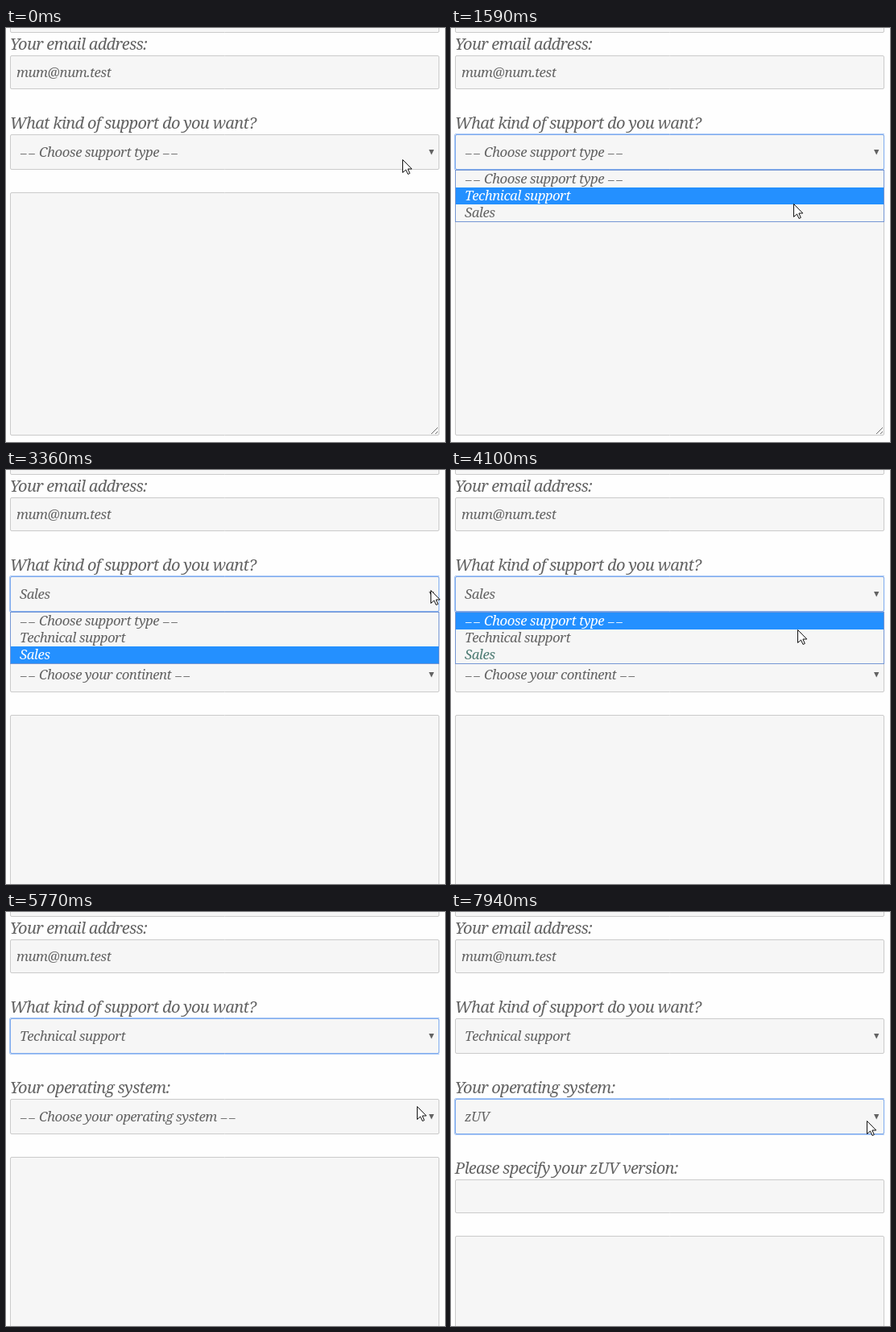
An HTML page with a canvas that plays this animation: 545 by 514 pixels, repeating every 7.99 s.

```html
<!DOCTYPE html>
<html lang="en">
<head>
<meta charset="utf-8">
<title>Conditional form</title>
<style>
html, body { margin: 0; width: 100%; height: 100%; overflow: hidden; background: #fefefe; }
canvas { display: block; }
</style>
</head>
<body>
<canvas id="stage" width="545" height="514"></canvas>
<script>
const ctx = document.getElementById('stage').getContext('2d');
const LOOP = 7990;
const W = 545, H = 514, LEFT = 5, WIDTH = 533;
const INK = '#636363', FILL = '#f6f6f6', BORDER = '#cbcbcb', PICK = '#2490ff';
const RING = '#7fabee', GLOW = '#a9c8f6';

const SUPPORT = ['-- Choose support type --', 'Technical support', 'Sales'];
const SYSTEMS = ['-- Choose your operating system --', 'Android', 'zUV', 'Linux', 'Pebbles', 'Other'];
const CONTINENT = '-- Choose your continent --';

// Pointer path: time, x, y
const PATH = [
  [0, 492, 163], [50, 492, 163], [240, 533, 139], [460, 528, 154],
  [1210, 528, 154], [1640, 417, 223], [2570, 417, 223], [2880, 525, 149],
  [3000, 525, 149], [3030, 527, 149], [3850, 527, 149], [4100, 430, 198],
  [4280, 426, 199], [5260, 426, 199], [5900, 525, 249], [6460, 525, 249],
  [6690, 452, 293], [6970, 440, 328], [7540, 440, 328], [7940, 516, 259], [LOOP, 516, 259]
];

// Open lists: time span, top edge, options, row lit before the pointer enters
const MENUS = [
  { from: 800, to: 2010, y: 176, items: SUPPORT, start: 0 },
  { from: 3360, to: 4610, y: 176, items: SUPPORT, start: 2 },
  { from: 6100, to: 7250, y: 276, items: SYSTEMS, start: 0 }
];

const clamp = v => Math.max(0, Math.min(1, v));
const swing = v => 0.5 - Math.cos(Math.PI * clamp(v)) / 2;
const slide = (t, start, size) => Math.floor(size * swing((t - start) / 215));

function pointer(t) {
  let i = 1;
  while (i < PATH.length - 1 && t > PATH[i][0]) i++;
  const [t0, x0, y0] = PATH[i - 1], [t1, x1, y1] = PATH[i];
  const p = clamp((t - t0) / (t1 - t0));
  const e = (p + p * p * (3 - 2 * p)) / 2;
  return { x: Math.round(x0 + (x1 - x0) * e), y: Math.round(y0 + (y1 - y0) * e) };
}

function write(str, x, y, size, spacing, color) {
  ctx.font = `italic 400 ${size}px "Noto Serif", serif`;
  ctx.letterSpacing = spacing + 'px';
  ctx.fillStyle = color;
  ctx.fillText(str, x, y);
  return ctx.measureText(str).width;
}

const label = (str, y) => write(str, 4.7, y, 20, -0.7, INK);

function value(str, x, y, color = INK) {
  if (!str.startsWith('-- ')) return write(str, x, y, 16.8, -0.5, color);
  const dash = dx => write('\u2013\u2013', dx, y, 15, 2.8, color);
  dash(x + 1);
  const w = write(str.slice(3, -3), x + 24, y, 16.8, -0.5, color);
  dash(x + 29 + w);
}

function box(y, h) {
  ctx.beginPath();
  ctx.roundRect(LEFT + 0.5, y + 0.5, WIDTH - 1, h - 1, 1.5);
  ctx.fillStyle = FILL;
  ctx.fill();
  ctx.lineWidth = 1;
  ctx.strokeStyle = BORDER;
  ctx.stroke();
}

function outline(y, h, grow, color) {
  ctx.beginPath();
  ctx.roundRect(LEFT + 0.5 - grow, y + 0.5 - grow, WIDTH - 1 + 2 * grow, h - 1 + 2 * grow, 1.5);
  ctx.lineWidth = 1;
  ctx.strokeStyle = color;
  ctx.stroke();
}

function select(y, str, focused) {
  box(y, 44);
  if (focused) {
    ctx.save();
    ctx.beginPath();
    ctx.rect(0, 0, 538, H);
    ctx.clip();
    outline(y, 44, 1, GLOW);
    outline(y, 44, 0, RING);
    ctx.restore();
  }
  value(str, 17, y + 28);
  ctx.fillStyle = INK;
  ctx.beginPath();
  ctx.moveTo(525, y + 19);
  ctx.lineTo(531.4, y + 19);
  ctx.lineTo(528.2, y + 25.5);
  ctx.fill();
}

// A form section revealed to height h; returns where the next one begins
function section(y, h, title, field) {
  if (h < 1) return y;
  ctx.save();
  ctx.beginPath();
  ctx.rect(0, y, W, h);
  ctx.clip();
  label(title, y + 21);
  field(y + 28);
  ctx.restore();
  return y + h;
}

function textarea(y) {
  box(y, 302);
  ctx.strokeStyle = '#6e6e6e';
  ctx.beginPath();
  for (const d of [8, 3]) {
    ctx.moveTo(536 - d, y + 300);
    ctx.lineTo(536, y + 300 - d);
  }
  ctx.stroke();
}

function menu({ y, items, start }, lit) {
  const h = items.length * 21 + 2;
  ctx.fillStyle = FILL;
  ctx.fillRect(LEFT, y, WIDTH, h);
  ctx.lineWidth = 1;
  ctx.strokeStyle = '#7596d4';
  ctx.strokeRect(LEFT + 0.5, y + 0.5, WIDTH - 1, h - 1);
  items.forEach((item, i) => {
    const top = y + 1 + i * 21;
    if (i === lit) {
      ctx.fillStyle = PICK;
      ctx.fillRect(LEFT + 1, top, WIDTH - 2, 21);
    }
    const left = start > 0 && i === start;
    value(item, 17, top + 16, i === lit ? '#fff' : left ? '#4c7a72' : INK);
  });
}

function arrow(x, y) {
  const pts = [[0, 0], [0, 16], [4, 12.5], [6.5, 18], [8.8, 17], [6.4, 11.5], [11.3, 11.5]];
  ctx.beginPath();
  pts.forEach(([dx, dy]) => ctx.lineTo(x + 0.5 + dx, y + 0.5 + dy));
  ctx.closePath();
  ctx.fillStyle = '#fff';
  ctx.fill();
  ctx.lineWidth = 1;
  ctx.strokeStyle = '#111';
  ctx.stroke();
}

function beam(x, y) {
  ctx.fillStyle = '#2c4a2c';
  ctx.fillRect(x, y - 7, 1, 15);
  for (const dy of [-8, 7]) {
    ctx.fillRect(x - 3, y + dy, 3, 1);
    ctx.fillRect(x + 1, y + dy, 3, 1);
  }
}

function heights(t) {
  let place = slide(t, 2105, 100);
  if (t >= 4712) place = t < 4930 ? slide(t, 4722, 100) : 0;
  return { system: slide(t, 4712, 100), place, version: slide(t, 7345, 98) };
}

function draw(t) {
  ctx.fillStyle = '#fefefe';
  ctx.fillRect(0, 0, W, H);

  box(-36, 42);
  label('Your email address:', 27);
  box(34, 42);
  value('mum@num.test', 13, 61);

  label('What kind of support do you want?', 125);
  const kind = t < 2010 ? 0 : t < 4610 ? 2 : 1;
  select(132, SUPPORT[kind], t >= 750 && t < 6100);

  const size = heights(t);
  const system = SYSTEMS[t < 7250 ? 0 : 2];
  let y = 204;
  y = section(y, size.system, 'Your operating system:', top => select(top, system, t >= 6100));
  y = section(y, size.version, 'Please specify your zUV version:', top => box(top, 42));
  y = section(y, size.place, 'Where is your business located?', top => select(top, CONTINENT, false));
  textarea(y);

  const p = pointer(t);
  const open = MENUS.find(m => t >= m.from && t < m.to);
  if (open) {
    const row = Math.floor((p.y - open.y - 2) / 21);
    menu(open, row < 0 ? open.start : row);
  }
  const overText = !open && ((p.y >= 204 && p.y < 232) || p.y >= 304);
  (overText ? beam : arrow)(p.x, p.y);
}

const begin = performance.now();
function tick() {
  draw((performance.now() - begin) % LOOP);
  requestAnimationFrame(tick);
}
tick();
</script>
</body>
</html>
```
